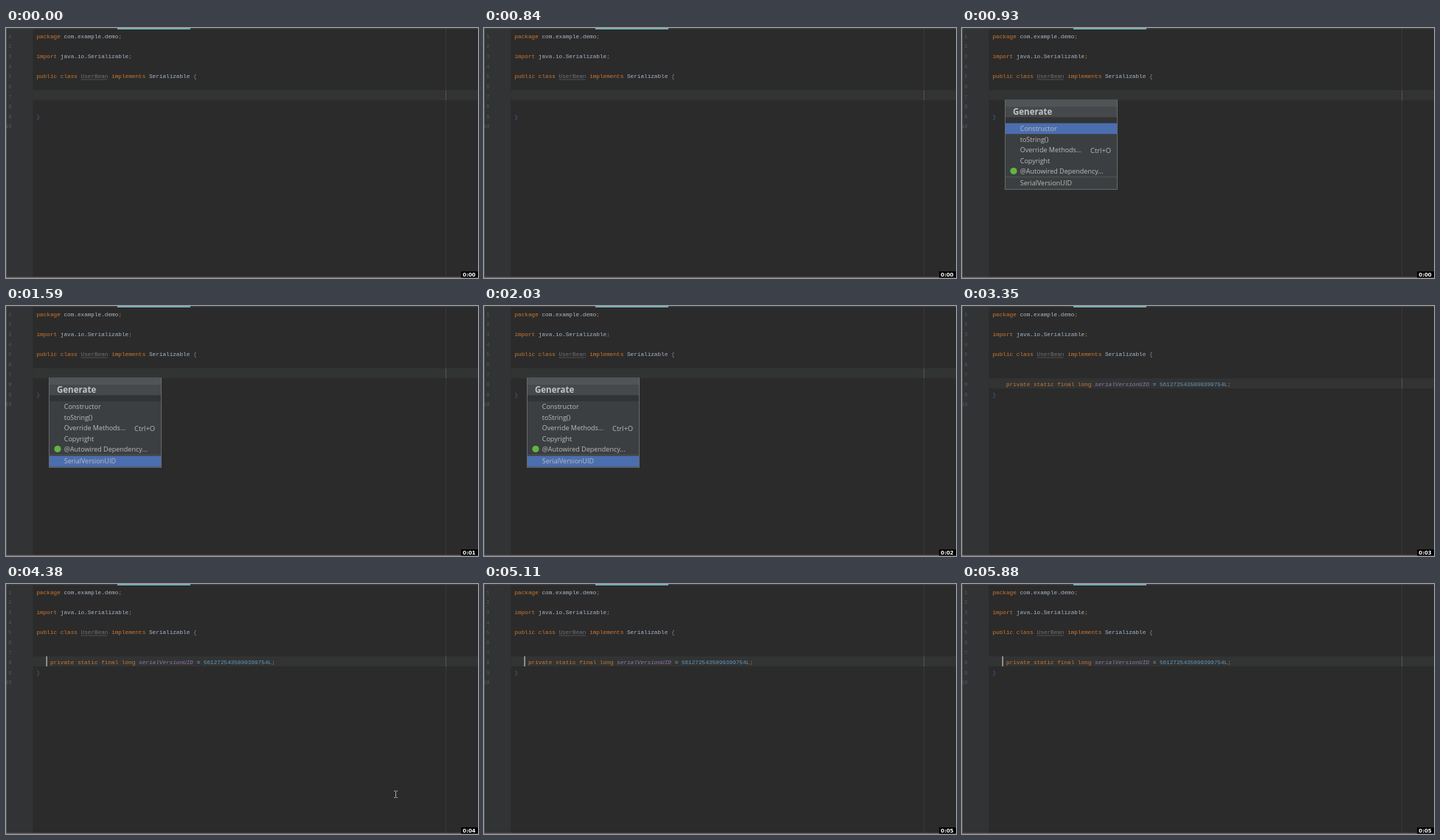
Write an HTML page with a canvas that moves like this. It is 640x340 px and loops after 5940 ms.

```html
<!DOCTYPE html>
<html lang="en">
<head>
<meta charset="utf-8">
<title>Generate menu in a code editor</title>
<style>
  html, body { margin: 0; width: 100%; height: 100%; overflow: hidden; background: #2b2b2b; }
  canvas { display: block; width: 640px; height: 340px; }
</style>
</head>
<body>
<canvas id="stage"></canvas>
<script>
const W = 640, H = 340, LOOP = 5940;
const canvas = document.getElementById('stage');
const ctx = canvas.getContext('2d');
const ratio = window.devicePixelRatio || 1;
canvas.width = W * ratio;
canvas.height = H * ratio;
ctx.scale(ratio, ratio);

const MONO = '"Liberation Mono", monospace';
const SANS = '"Open Sans", "Noto Sans", sans-serif';
const COL = 4.62, ROW = 13.65, LEFT = 41.5;
const KEY = '#cc7832', PLAIN = '#a9b7c6', NUMBER = '#6897bb', FIELD = '#9876aa';
const UNUSED = '#72737a';

const lineY = n => 11 + (n - 1) * ROW;
const between = (t, a, b) => t >= a && t < b;

function rect(x, y, w, h, color) {
  ctx.fillStyle = color;
  ctx.fillRect(x, y, w, h);
}

function text(str, x, y, color, font, align = 'left') {
  ctx.font = font;
  ctx.textAlign = align;
  ctx.fillStyle = color;
  ctx.fillText(str, x, y);
}

// Each part is [string, color, style]; columns follow from the lengths.
function code(line, parts, col = 0) {
  for (const [str, color, style = ''] of parts) {
    text(str, LEFT + col * COL, lineY(line) + 2.6, color, `${style} 7.7px ${MONO}`);
    col += str.length;
  }
}

function drawEditor(row) {
  rect(0, 0, W, H, '#2b2b2b');
  rect(0, 0, 36.5, H, '#313335');
  const top = lineY(row) - 8.2;
  rect(36.5, top, W - 36.5, 13.6, '#323434');
  rect(596, 0, 1, H, '#383838');
  rect(596, top, 1, 13.6, '#555757');
  rect(0, 0, W, 1.5, '#3c3f41');
  rect(151, 0, 99, 2, '#78abb0');
  rect(0, 0, 1, H, '#56585a');
  rect(0, 338.6, W, 1.4, '#71636a');

  for (let n = 1; n <= 10; n++) {
    text(n, 7.5, lineY(n) + 2.6, '#55595c', `7px ${MONO}`, 'right');
  }
}

function drawSquiggle(x, y, w) {
  ctx.beginPath();
  for (let i = 0; i <= w; i++) ctx.lineTo(x + i, y + (i % 2 ? 0.6 : -0.4));
  ctx.strokeStyle = '#6c6e70';
  ctx.lineWidth = 0.7;
  ctx.stroke();
}

function drawCode(t) {
  code(1, [['package ', KEY], ['com.example.demo', PLAIN], [';', KEY]]);
  code(3, [['import ', KEY], ['java.io.Serializable', PLAIN], [';', KEY]]);
  code(5, [['public class ', KEY], ['UserBean', UNUSED], [' implements ', KEY],
    ['Serializable ', PLAIN], ['{', '#858b90']]);
  drawSquiggle(LEFT + 13 * COL, lineY(5) + 4.4, 8 * COL);
  if (t >= 2360) {
    const name = t < 2670 ? [PLAIN] : [FIELD, 'italic'];
    code(8, [['private static final long ', KEY], ['serialVersionUID', ...name],
      [' = ', PLAIN], ['5612725435099399754L', NUMBER], [';', KEY]], 4);
  }
  code(9, [['}', '#4262ae']]);
}

const items = [
  ['Constructor', 136.7], ['toString()', 151.3], ['Override Methods...', 166],
  ['Copyright', 180.5], ['@Autowired Dependency...', 195], ['SerialVersionUID', 211]
];

function drawMenu(t) {
  rect(58, 97.5, 153, 122.5, '#66696b');
  rect(59, 98.5, 151, 120.5, '#3c3f41');
  rect(59, 98.5, 151, 9, '#515456');
  rect(59, 107.5, 151, 14, '#46494b');
  rect(59, 121.5, 151, 8, '#313335');
  text('Generate', 69, 118.2, '#c2c4c6', `bold 11.5px ${SANS}`);
  rect(59, 202.3, 151, 0.8, '#56595b');

  rect(59, t < 1590 ? 129.5 : 204, 151, 14.6, '#4b6eaf');
  for (const [label, y] of items) text(label, 78.7, y + 3.2, '#bbbbbb', `9px ${SANS}`);
  text('Ctrl+O', 174, 169.5, '#bbbbbb', `9.4px ${SANS}`);

  ctx.beginPath();
  ctx.arc(70, 194.5, 4.6, 0, Math.PI * 2);
  ctx.fillStyle = '#62b543';
  ctx.fill();
}

function drawCaret(t) {
  if (between(t, 310, 840)) rect(59.4, 84.6, 1.3, 13.8, '#bbbbbb');
  const on = between(t, 2360, 3350) || between(t, 3900, 4460) ||
    between(t, 4930, 5450) || t >= 5880;
  if (on) rect(54.5, 98.3, 1.3, 13.8, '#bbbbbb');
}

// The pointer crosses the editor in 80 ms steps, slowing slightly.
function drawPointer(t) {
  if (!between(t, 3900, 4550)) return;
  const d = Math.min(7, Math.floor((t - 3900) / 80)) - 6;
  const curve = d * (d - 1);
  const x = Math.round(528 + 29 * d - 0.35 * curve);
  const y = Math.round(286 + 38 * d - 0.52 * curve);
  const color = '#a8a8a8';
  rect(x, y - 4, 1, 8, color);
  for (const end of [-5, 4]) {
    rect(x - 2, y + end, 2, 1, color);
    rect(x + 1, y + end, 2, 1, color);
  }
}

function drawTimer(t) {
  const seconds = [1030, 2030, 3010, 4060, 5110].filter(at => t >= at).length;
  rect(617, 331, 23, 8.5, '#000');
  text('0:0' + seconds, 619.3, 338, '#fff', 'bold 7px "DejaVu Sans", sans-serif');
}

function draw(t) {
  drawEditor(t < 2360 ? 7 : 8);
  drawCode(t);
  if (between(t, 930, 2360)) drawMenu(t);
  drawCaret(t);
  drawPointer(t);
  drawTimer(t);
}

const start = performance.now();
function tick() {
  draw((performance.now() - start) % LOOP);
  requestAnimationFrame(tick);
}
tick();
</script>
</body>
</html>
```
